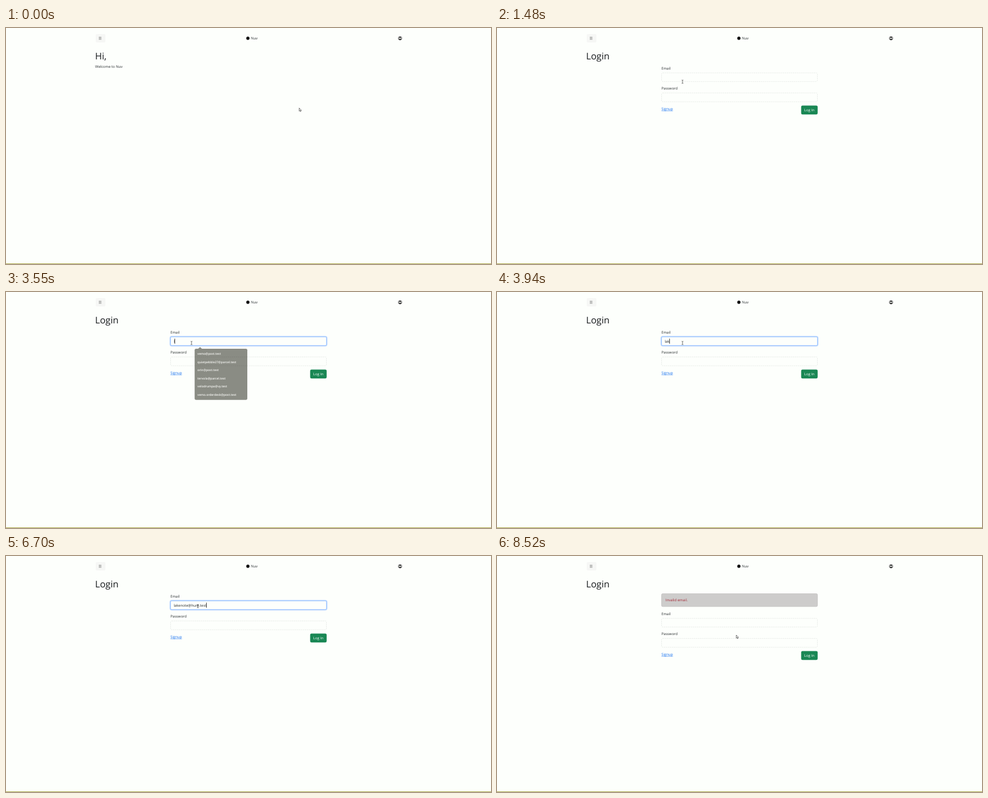
Recreate the animation shown at these times as an HTML page. Size 800 px wide and 391 px high, loop 8550 ms.

```html
<!DOCTYPE html>
<html lang="en">
<head>
<meta charset="utf-8">
<title>Login</title>
<style>
html, body { margin: 0; width: 100%; height: 100%; overflow: hidden; background: #fdfffc; }
svg { display: block; width: 800px; height: 391px; }
text { font: 5.95px 'Open Sans', 'Noto Sans', sans-serif; fill: #2b2f33; text-rendering: geometricPrecision; white-space: pre; }
#title { font-size: 15.2px; font-weight: 500; fill: #15181b; }
#menu text { font-size: 5.1px; font-weight: 600; fill: #f1f1ec; }
.field { fill: none; stroke: #e3e6e3; stroke-width: .8; stroke-dasharray: 2 1.2; }
.icon { fill: none; stroke: #111; stroke-width: .8; }
#cursor path { fill: #fff; stroke: #222; stroke-width: .6; stroke-linejoin: round; }
</style>
</head>
<body>
<svg viewBox="0 0 800 391">
  <rect y="390" width="800" height="1" fill="#b3b056"/>

  <rect x="148" y="10" width="16" height="14" rx="2" fill="#f6f7f5"/>
  <path d="M153 15.2h4.4M153 17h4.4M153 18.8h4.4" stroke="#555" stroke-width=".6"/>
  <circle cx="399" cy="17" r="2.7" fill="#111"/>
  <text x="404" y="19.2">Nuv</text>
  <circle class="icon" cx="650" cy="17" r="2.8"/>
  <circle cx="650" cy="16.1" r="1.15" fill="#111"/>
  <path d="M647.9 19q2.1-2.2 4.2 0q-2.1 1.7-4.2 0" fill="#111"/>

  <text id="title" x="147" y="52"></text>
  <text id="welcome" x="147" y="66">Welcome to Nuv</text>

  <g id="alert">
    <rect x="271.4" y="62.4" width="257.2" height="21.4" rx="2" fill="#cdcccb" stroke="#bdbcbb" stroke-width=".7"/>
    <text x="278" y="75.4" style="fill:#a52a37">Invalid email.</text>
  </g>

  <g id="form">
    <text x="271.3" y="69">Email</text>
    <rect class="field" x="271.5" y="74.3" width="257" height="14.4" rx="2"/>
    <g id="focus">
      <rect x="271" y="74" width="258" height="15" rx="2.5" fill="none" stroke="#c2dbfe" stroke-width="2.4"/>
      <rect x="271.4" y="74.3" width="257.2" height="14.4" rx="2" fill="#fdfffc" stroke="#86b7fe" stroke-width=".8"/>
    </g>
    <text id="value" x="276.5" y="84"></text>
    <rect id="caret" y="77.3" width=".8" height="8.4" fill="#111"/>
    <text x="271.3" y="102.3">Password</text>
    <rect class="field" x="271.5" y="107.6" width="257" height="14.6" rx="2"/>
    <text x="271.3" y="135.8" text-decoration="underline" style="fill:#1b73ee">Signup</text>
    <rect id="ring" x="500.2" y="127" width="30.4" height="18" rx="3.4" fill="#9ecbb5"/>
    <rect id="button" x="501.7" y="128.5" width="27.2" height="14.8" rx="2.2"/>
    <text x="515.2" y="138.3" text-anchor="middle" style="fill:#fff">Log In</text>
  </g>

  <g id="menu">
    <path d="M315.5 93l3.5-3.2 3.5 3.2z" fill="#17180c"/>
    <rect x="309.8" y="92.6" width="89.6" height="87.6" rx="2.4" fill="#17180c"/>
  </g>

  <g id="cursor">
    <path id="arrow" d="M0 0V5.1L1.2 4.1 2 5.9 2.9 5.5 2.1 3.8H3.6Z"/>
    <path id="beam" d="M-1.4-2.8Q0-2.8 0-2Q0-2.8 1.4-2.8M0-2V2M-1.4 2.8Q0 2.8 0 2Q0 2.8 1.4 2.8" style="fill:none"/>
    <path id="hand" d="M-.6 0Q0-.6.6 0V2.3L2.9 2.9V5L2.2 6.5H-.5L-2.2 4.2-1.6 3.6-.6 4.3Z"/>
  </g>
</svg>
<script>
const LOOP = 8550, LOGIN = 950, FOCUS = 1850, SUBMIT = 6950, REJECT = 7960;
const ADDRESS = 'lakenote@hum.test';
const suggestions = ['vemo@post.test', 'quietpebble27@parcel.test', 'orin@post.test',
  'tervola@parcel.test', 'velodrumpa@vy.test', 'vemo.orderdesk@post.test'];
// time, x, y
const route = [[0, 483.6, 132.6], [90, 483.6, 132.6], [760, 649.5, 15.5], [1020, 649.5, 15.5],
  [1450, 306, 89], [1620, 306, 89], [1800, 306, 84.5], [6560, 306, 84.5], [6700, 316.5, 83],
  [6920, 514, 136], [7350, 514, 136], [8300, 394.7, 131], [LOOP, 394.7, 131]];

const $ = id => document.getElementById(id);
const show = (id, on) => $(id).style.display = on ? '' : 'none';
const clamp = v => Math.max(0, Math.min(1, v));
const ease = v => v * v * (3 - 2 * v);

suggestions.forEach((s, i) => {
  const line = document.createElementNS('http://www.w3.org/2000/svg', 'text');
  line.setAttribute('x', 314.6);
  line.setAttribute('y', 102.9 + i * 14.05);
  line.textContent = s;
  $('menu').append(line);
});

function pointerAt(t) {
  const i = Math.max(1, route.findIndex(p => p[0] > t));
  const [t0, x0, y0] = route[i - 1], [t1, x1, y1] = route[i];
  const k = ease((t - t0) / (t1 - t0));
  return [x0 + (x1 - x0) * k, y0 + (y1 - y0) * k];
}

const inside = (x, y, l, t, r, b) => x > l && x < r && y > t && y < b;

// Number of typed characters and the time of the latest key
function typing(t) {
  if (t < 3500) return [0, FOCUS];
  const n = t < 5240 ? Math.min(8, 1 + Math.floor((t - 3500) / 215))
                     : Math.min(17, 8 + Math.floor((t - 5240) / 140));
  return [n, n > 8 ? 5240 + (n - 8) * 140 : 3500 + (n - 1) * 215];
}

function draw(t) {
  const login = t >= LOGIN, rejected = t >= REJECT, focused = t >= FOCUS && t < SUBMIT;
  const shift = rejected ? 29 : 0;
  $('title').textContent = login ? 'Login' : 'Hi,';
  show('welcome', !login);
  show('form', login);
  show('alert', rejected);
  $('form').setAttribute('transform', `translate(0 ${shift})`);

  show('focus', focused);
  $('focus').style.opacity = clamp((t - FOCUS) / 150);
  const [count, lastKey] = typing(t);
  $('value').textContent = rejected ? '' : ADDRESS.slice(0, count);
  show('caret', focused && (t - lastKey) % 1000 < 500);
  $('caret').setAttribute('x', 276.4 + (count ? $('value').getComputedTextLength() : 0));

  const open = clamp((t - 1950) / 150) * clamp((3650 - t) / 200);
  const size = .94 + .06 * open;
  show('menu', open > 0);
  $('menu').style.opacity = open;
  $('menu').setAttribute('transform', `translate(354.6 136) scale(${size}) translate(-354.6 -136)`);

  const [x, y] = pointerAt(t);
  const onButton = login && inside(x, y, 501, 128 + shift, 529, 143 + shift);
  const onField = login && (inside(x, y, 271, 74 + shift, 529, 90 + shift)
    || inside(x, y, 271, 107 + shift, 529, 122 + shift));
  const onLink = onButton || inside(x, y, 645, 11, 655, 23);
  $('button').setAttribute('fill', onButton ? '#157347' : '#198754');
  show('ring', t >= SUBMIT && !rejected);
  show('hand', onLink);
  show('beam', onField);
  show('arrow', !onLink && !onField);
  $('cursor').setAttribute('transform', `translate(${x} ${y})`);
}

const start = performance.now();
function frame() {
  draw((performance.now() - start) % LOOP);
  requestAnimationFrame(frame);
}
frame();
</script>
</body>
</html>
```
